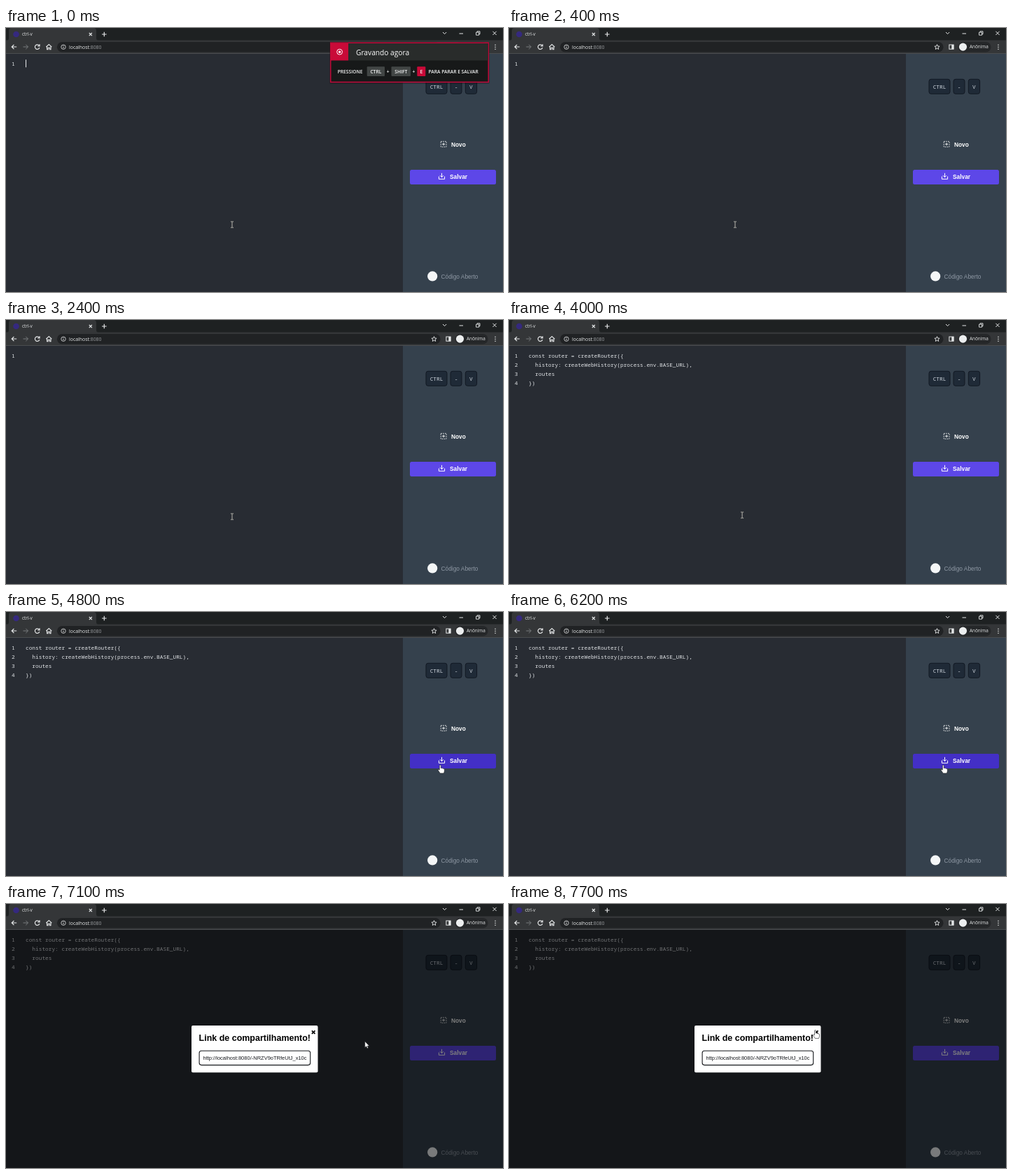
Write an HTML page that moves like this. It is 710 px wide and 378 px high and loops after 8000 ms.

```html
<!DOCTYPE html>
<html lang="pt-BR">
<head>
<meta charset="utf-8">
<title>ctrl-v</title>
<style>
html, body { margin: 0; width: 100%; height: 100%; overflow: hidden; background: #282c33; }
svg { display: block; width: 100vw; height: 100vh; }
text { white-space: pre; }
.ui { font-family: "Open Sans", "Noto Sans", sans-serif; }
.mono { font-family: "Noto Sans Mono", "DejaVu Sans Mono", monospace; font-size: 7.8px; }
.sans { font-family: "Liberation Sans", Arial, sans-serif; font-size: 8.33px; }
.bold { font-weight: 700; }
.line { fill: none; stroke: #e6e8e9; stroke-width: 1; }
.mid { text-anchor: middle; }
</style>
</head>
<body>
<svg viewBox="0 0 710 378" preserveAspectRatio="none">
  <defs>
    <clipPath id="field"><rect x="281" y="211" width="148.5" height="19"/></clipPath>
  </defs>

  <!-- browser frame -->
  <rect width="710" height="18" fill="#1e2122"/>
  <path d="M1 18Q4 18 4 14V4Q4 0 8 0H125Q129 0 129 4V14Q129 18 132 18Z" fill="#343638"/>
  <rect y="17.5" width="710" height="19.5" fill="#343638"/>
  <rect y="36" width="710" height="1" fill="#4b4d50"/>
  <circle cx="14.5" cy="9" r="4.3" fill="#35297f"/>
  <text class="ui" x="23" y="11.3" font-size="6.4" fill="#e3e5e6">ctrl-v</text>
  <g class="line">
    <path d="M118.8 7L122.8 11M122.8 7L118.8 11M137 9H143.6M140.3 5.7V12.3" stroke-width="1.2"/>
    <path d="M624 6L626.6 8.6L629.2 6M647.5 8H653"/>
    <path d="M671.6 6.2H675.6V10.2H671.6ZM673 6V4.8H677V8.8H675.8" stroke-width=".9"/>
    <path d="M695.4 4.8L700.6 10M700.6 4.8L695.4 10"/>
    <path d="M15.2 27H8.2M11.4 23.8L8.2 27L11.4 30.2" stroke-width="1.2"/>
    <path d="M24.5 27H31.5M28.3 23.8L31.5 27L28.3 30.2" stroke="#797c7e"/>
    <path d="M47.4 25.2A3.3 3.3 0 1 0 47.8 28.2M48 23.2V26H45.2" stroke-width="1.2"/>
    <path d="M57.3 27.2L61.3 23.5L65.3 27.2M58.6 26.4V30.8H60.2V28.2H62.4V30.8H64V26.4" stroke-width="1.1"/>
  </g>
  <rect x="73" y="20" width="547.5" height="14.5" rx="7.2" fill="#202224"/>
  <g class="line" stroke-width=".8">
    <circle cx="82" cy="27.2" r="3.2" stroke-width=".8"/>
    <path d="M82 26.7V29M82 25.1V25.9" stroke-width=".9"/>
    <path id="star" stroke-width=".9"/>
    <rect x="628.9" y="24" width="6.2" height="6.2"/>
  </g>
  <rect x="632.3" y="24" width="2.9" height="6.2" fill="#e6e8e9"/>
  <text class="ui" x="90" y="29.7" font-size="6.9" fill="#e6e8e9">localhost<tspan fill="#999c9f">:8080</tspan></text>
  <rect x="641.5" y="20" width="47" height="14.5" rx="7.2" fill="#252729"/>
  <circle cx="648.5" cy="27.1" r="5.6" fill="#eceeef"/>
  <text class="ui" x="658" y="29.4" font-size="6.4" fill="#e3e5e6">Anônima</text>
  <path d="M699 24.3h.01M699 27.3h.01M699 30.3h.01" stroke="#e6e8e9" stroke-width="1.6" stroke-linecap="round"/>

  <!-- editor -->
  <rect y="37" width="567" height="341" fill="#282c33"/>
  <g id="code" class="mono" fill="#dfe2e5"></g>
  <rect id="caret" width="1" height="11" fill="#e9ebed"/>

  <!-- side panel -->
  <rect x="567" y="37" width="143" height="341" fill="#35414d"/>
  <g id="keys" class="mono mid" fill="#cdd4dc"></g>
  <g class="line">
    <rect x="621.2" y="162.4" width="7.8" height="7.8" stroke-dasharray="1.6 1.3"/>
    <path d="M623.1 166.3H627.1M625.1 164.3V168.3"/>
  </g>
  <text class="sans bold" x="636" y="170.1" fill="#fff">Novo</text>
  <rect id="save" x="577" y="203" width="123" height="21" rx="2.5"/>
  <path class="line" d="M618.4 212.5V216.3H626.6V212.5M622.5 207.8V213.4M620 211.2L622.5 213.7L625 211.2" stroke-width="1.2" style="stroke:#fff"/>
  <text class="sans bold" x="634" y="216.4" fill="#fff">Salvar</text>
  <circle cx="609.2" cy="355.4" r="7.1" fill="#f4f6f7"/>
  <text class="sans" x="621.6" y="359.3" fill="#8e98a4">Código Aberto</text>

  <!-- share dialog -->
  <g id="dialog">
    <rect y="37" width="710" height="341" fill="#000" opacity=".5"/>
    <rect x="265" y="174" width="180.5" height="67.3" rx="2" fill="#fff"/>
    <text class="sans bold" x="275.6" y="195.6" style="font-size:12.48px">Link de compartilhamento!</text>
    <path d="M436.9 181.3L441.5 185.9M441.5 181.3L436.9 185.9" stroke="#000" stroke-width="1.7"/>
    <rect x="276.1" y="210.2" width="158.6" height="20.4" rx="3" fill="#fff" stroke="#16181c" stroke-width="1.1"/>
    <text class="sans" x="281.5" y="223.1" fill="#16181c" clip-path="url(#field)" style="font-size:7.5px">http://localhost:8080/-NRZV9oTRfeUtJ_x10c</text>
  </g>

  <!-- recorder notice -->
  <g id="notice">
    <rect x="462" y="20" width="229" height="60" rx="2" fill="#000" opacity=".25"/>
    <rect x="463.7" y="21.2" width="225.6" height="56.3" fill="#171919" stroke="#bd0a39" stroke-width="1.6"/>
    <rect x="489" y="22" width="199.5" height="24.5" fill="#292c2b"/>
    <rect x="464" y="22" width="25" height="24.5" fill="#c90a38"/>
    <circle cx="476.6" cy="34.2" r="3.9" fill="none" stroke="#fff"/>
    <circle cx="476.6" cy="34.2" r="1.7" fill="#fff"/>
    <text class="ui" x="500" y="39" font-size="10.2" fill="#fff">Gravando agora</text>
    <g id="hint" class="ui" font-size="6.7" font-weight="600" fill="#f3f4f4"></g>
  </g>

  <!-- pointers, each with its hot spot at 0,0 -->
  <path id="beam" d="M-2 -4.3H-.6L0 -3.8L.6 -4.3H2M0 -3.8V3.8M-2 4.3H-.6L0 3.8L.6 4.3H2" fill="none" stroke="#c9c7bd" stroke-width=".9"/>
  <path id="arrow" d="M0 0V8.6L2 6.8L3.3 9.8L4.7 9.2L3.4 6.3H6.1Z" fill="#fff" stroke="#16181c" stroke-width=".5"/>
  <path id="hand" d="M-1 .8Q-1 -.2 0 -.2T1 .8V4.2Q2 3.5 2.7 4.5Q3.8 3.9 4.4 5Q6 4.7 6 6.3V8.2Q6 9.8 5 11.6H-.2Q-1 10 -2.8 7.8Q-3.5 6.5 -2.6 6.1Q-1.9 5.9 -1 7Z" fill="#fff" stroke="#16181c" stroke-width=".6"/>
</svg>
<script>
const LOOP = 8000, STEP = 100;
const $ = id => document.getElementById(id);
const show = (id, on) => $(id).setAttribute("visibility", on ? "visible" : "hidden");
const box = (x, y, w, h, rest) => `<rect x="${x}" y="${y}" width="${w}" height="${h}" ${rest}/>`;
const label = (x, y, text, rest = "") => `<text x="${x}" y="${y}" ${rest}>${text}</text>`;

const lines = [
  "const router = createRouter({",
  "  history: createWebHistory(process.env.BASE_URL),",
  "  routes",
  "})"
];
$("code").innerHTML = label(8, 53.8, 1) + '<g id="pasted">' +
  lines.map((s, i) => {
    const y = 53.8 + 13 * i;
    return (i ? label(8, y, i + 1) : "") + label(28, y, s);
  }).join("") + "</g>";

$("keys").innerHTML = [["CTRL", 600, 30], ["-", 635, 16], ["V", 656.3, 16.3]].map(([s, x, w]) =>
  box(x, 73.3, w, 21, 'rx="3" fill="#1f2a37" stroke="#121923"') + label(x + w / 2, 87, s)).join("");

const keyCap = (s, x, w, fill) =>
  box(x, 55.3, w, 13.7, `rx="1" fill="${fill}"`) + label(x + w / 2, 64.7, s, 'class="mid"');
$("hint").innerHTML = label(473.7, 64.7, "PRESSIONE") +
  keyCap("CTRL", 515.7, 25.3, "#424645") + label(543.8, 64.7, "+") +
  keyCap("SHIFT", 550.5, 27.5, "#424645") + label(580.6, 64.7, "+") +
  keyCap("E", 587.3, 12, "#c90a38") + label(603.6, 64.7, "PARA PARAR E SALVAR");

$("star").setAttribute("d", "M" + Array.from({ length: 10 }, (_, i) => {
  const r = i % 2 ? 1.7 : 3.8, a = i * Math.PI / 5;
  return `${(611.5 + r * Math.sin(a)).toFixed(2)} ${(27.4 - r * Math.cos(a)).toFixed(2)}`;
}).join("L") + "Z");

// Caret toggles at each of these times, starting visible.
const blinks = [300, 800, 1400, 1900, 2400, 3000, 3700, 4200, 4800, 5300, 5800];
const PASTE = 3200, OPEN = 6300;

const rest = [323, 281.5], onSave = [618, 219.3], onClose = [437.5, 180.8];

function glide(a, b, t, from, to) {
  const u = Math.min(1, Math.max(0, (t - from) / (to - from)));
  const e = u * u * (3 - 2 * u);
  return a.map((v, i) => v + (b[i] - v) * e);
}

function draw(time) {
  const t = Math.floor(time / STEP) * STEP;
  const open = t >= OPEN;

  show("notice", t < 400);
  $("notice").setAttribute("opacity", t < 300 ? 1 : .5);

  show("pasted", t >= PASTE);
  show("caret", !open && blinks.filter(b => b <= t).length % 2 === 0);
  $("caret").setAttribute("x", t < PASTE ? 28 : 37.6);
  $("caret").setAttribute("y", t < PASTE ? 45.3 : 84.3);

  const [x, y] = open ? glide(onSave, onClose, t, 6600, 7500) : glide(rest, onSave, t, 3900, 4800);
  const overSave = !open && x > 577 && y > 203 && y < 224;
  const kind = open ? (t >= 7600 ? "hand" : "arrow") : overSave ? "hand" : x > 567 ? "arrow" : "beam";
  for (const id of ["beam", "arrow", "hand"]) show(id, id === kind);
  const nudge = kind === "hand" && !open ? 2.3 : 0;
  $(kind).setAttribute("transform", `translate(${x + nudge} ${y})`);

  $("save").setAttribute("fill", overSave || t === OPEN ? "#432fc6" : "#5d47e8");
  show("dialog", open);
}

const start = performance.now();
function tick() {
  draw((performance.now() - start) % LOOP);
  requestAnimationFrame(tick);
}
tick();
</script>
</body>
</html>
```
